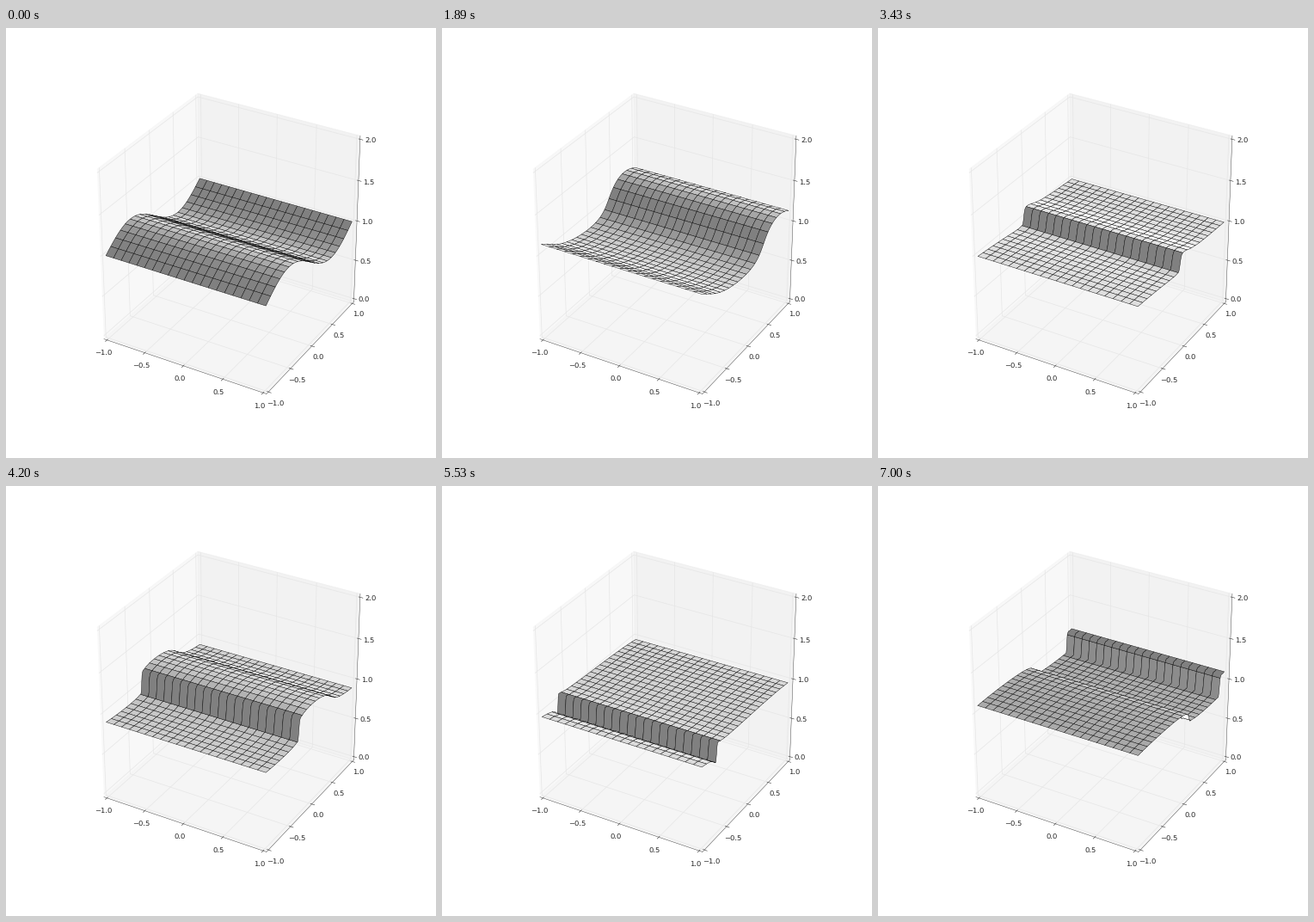
Write a matplotlib script that moves like this. It is 500 by 500 pixels and loops after 7.07 s.

```python
import numpy as np
import matplotlib.pyplot as plt
from matplotlib.animation import FuncAnimation
from matplotlib.collections import PolyCollection
from matplotlib.patches import Polygon

plt.rcParams["text.hinting"] = "none"

FRAMES, INTERVAL = 101, 70
SUBSTEPS, DT = 10, 0.001
N, STRIDE = 200, 10
DY = 2 / N
G = 9.8
INK = "0.15"


# Shallow water on a periodic channel: central scheme with limited slopes

def flux(q):
    h, m = q
    return np.array([m, m * m / h + G * h * h / 2])


def speed(q):
    return np.abs(q[1] / q[0]) + np.sqrt(G * q[0])


def rate(q):
    back = q - np.roll(q, 1, -1)
    ahead = np.roll(q, -1, -1) - q
    size = np.minimum(2 * np.minimum(abs(back), abs(ahead)),
                      abs(back + ahead) / 2)
    half = np.where(back * ahead > 0, np.sign(back) * size, 0) / 2
    left, right = q + half, np.roll(q - half, -1, -1)
    a = np.maximum(speed(left), speed(right))
    f = (flux(left) + flux(right) - a * (right - left)) / 2
    return (np.roll(f, 1, -1) - f) / DY


def solve():
    y = -1 + DY * np.arange(N)
    q = np.array([1 - 0.2 * np.sin(np.pi * y), np.ones(N)])
    heights = []
    for _ in range(FRAMES):
        heights.append(np.append(q[0], q[0, 0]))
        for _ in range(SUBSTEPS):
            mid = q + DT * rate(q)
            q = (q + mid + DT * rate(mid)) / 2
    return heights


# Perspective view of the unit cube, in stage pixels

ELEV, AZIM, DIST = np.radians(30), np.radians(-60), 10
TOWARD = np.array([np.cos(AZIM) * np.cos(ELEV),
                   np.sin(AZIM) * np.cos(ELEV), np.sin(ELEV)])
RIGHT = np.array([-np.sin(AZIM), np.cos(AZIM), 0])
UP = np.cross(TOWARD, RIGHT)
SCALE = np.array([387.5, 400]) / 0.185
ORIGIN = np.array([62.5, 50]) + 0.095 * SCALE


def project(p):
    """Centred cube coordinates to pixels and depth."""
    p = np.asarray(p, float)
    depth = DIST - p @ TOWARD
    flat = np.stack([p @ RIGHT, p @ UP], -1) / depth[..., None]
    return ORIGIN + flat * SCALE, depth


fig = plt.figure(figsize=(10, 10), dpi=50, facecolor="white")
ax = fig.add_axes([0, 0, 1, 1])
ax.set(xlim=(0, 500), ylim=(0, 500))
ax.axis("off")

DELTA = 1 / 12
EDGE = 0.5 + DELTA / 4
LABEL_GAP = DELTA * 12 * 48 / (72 * 15.75)
WALLS = np.array([-EDGE, EDGE, -EDGE])
layer = 0


def stroke(points, color, width, cap="projecting"):
    global layer
    layer += 1
    xy, _ = project(points)
    ax.plot(xy[:, 0], xy[:, 1], color=color, lw=width, zorder=layer,
            solid_capstyle=cap)


def draw_pane(axis, gray):
    global layer
    layer += 1
    b, c = [k for k in range(3) if k != axis]
    corners = np.tile(WALLS, (4, 1))
    corners[:, b] = [-EDGE, EDGE, EDGE, -EDGE]
    corners[:, c] = [-EDGE, -EDGE, EDGE, EDGE]
    ax.add_patch(Polygon(project(corners)[0], closed=False, lw=1, alpha=0.5,
                         facecolor=str(gray), edgecolor=str(gray),
                         zorder=layer))


def draw_axis(axis, flip, tick_dir, first):
    base = WALLS.copy()
    base[flip] *= -1
    ends = np.array([base, base])
    ends[:, axis] = [-EDGE, EDGE]
    stroke(ends, INK, 0.55)

    spots = np.linspace(-0.5, 0.5, 5)
    for s in spots:
        line = np.tile(WALLS, (3, 1))
        line[:, axis] = s
        line[0, (axis + 1) % 3] *= -1
        line[2, (axis + 2) % 3] *= -1
        stroke(line, "0.9", 1, "butt")

    out = np.sign(base[tick_dir])
    for k, s in enumerate(spots):
        tick = np.array([base, base])
        tick[:, axis] = s
        tick[:, tick_dir] += out * DELTA * np.array([-0.1, 0.2])
        stroke(tick, INK, 0.75)
        spot = base + np.sign(base) * LABEL_GAP
        spot[axis] = s
        x, y = project(spot)[0]
        text = f"{first + 0.5 * k:.1f}".replace("-", "\u2212")
        ax.text(x, y, text, ha="center", va="top", fontsize=12,
                family="DejaVu Sans", color=INK, zorder=layer)


for axis, gray in enumerate((0.95, 0.9, 0.925)):
    draw_pane(axis, gray)
draw_axis(0, 1, 1, -1)
draw_axis(1, 0, 0, -1)
draw_axis(2, 0, 0, 0)

# Outline of one patch as (x, y) node offsets
up, down = np.arange(STRIDE + 1), np.arange(STRIDE)[::-1]
low, high = np.zeros(STRIDE, int), np.full(STRIDE, STRIDE)
RING_X = np.concatenate([[0], low, up[1:], high, down])
RING_Y = np.concatenate([up, high, down, low])
starts = np.arange(0, N, STRIDE)
sx, sy = (g.ravel()[:, None] for g in np.meshgrid(starts, starts, indexing="ij"))
IX, IY = sx + RING_X, sy + RING_Y
SIDES = len(RING_X)
LIGHT = np.array([-1, -1, 0.5])

# Neighbouring patches both draw their shared edge, so the line is thin
surface = PolyCollection([], edgecolors="black", linewidths=0.6,
                         zorder=layer + 1)
ax.add_collection(surface)
heights = solve()


def update(frame):
    pts = np.stack([IX * DY - 1, IY * DY - 1, heights[frame][IY]], -1)
    a, b, c = pts[:, 0], pts[:, SIDES // 3], pts[:, 2 * SIDES // 3]
    normal = np.cross(a - b, b - c)
    shade = normal @ LIGHT / np.linalg.norm(normal, axis=1)
    shade = 0.5 + 0.5 * (shade - shade.min()) / np.ptp(shade)
    xy, depth = project((pts - [0, 0, 1]) / 2)
    order = np.argsort(-(-1 / depth).mean(axis=1), kind="stable")
    order = order[::-1] if depth[order[0]].mean() < depth[order[-1]].mean() else order
    surface.set_verts(xy[order])
    surface.set_facecolor(np.repeat(shade[order, None], 3, axis=1))
    return [surface]


anim = FuncAnimation(fig, update, frames=FRAMES, interval=INTERVAL,
                     init_func=lambda: update(0), repeat=True,
                     repeat_delay=0, blit=False)
plt.show()
```
